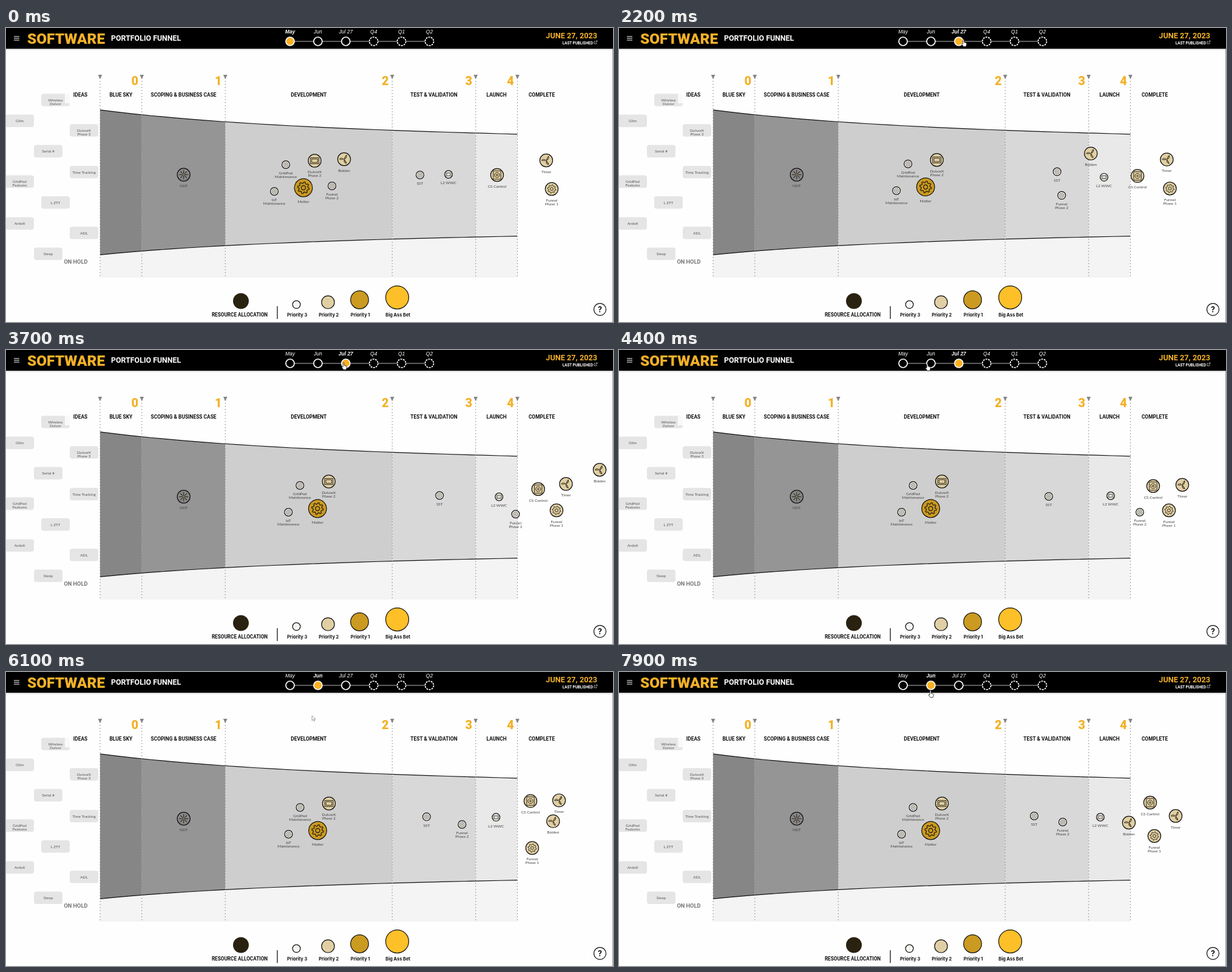
Animation of 1000x484 px, one loop 8 s. Source, as an HTML page:

```html
<!DOCTYPE html>
<html lang="en">
<head>
<meta charset="utf-8">
<title>Portfolio funnel</title>
<style>
html, body { margin: 0; width: 100%; height: 100%; overflow: hidden; background: #fefefe; }
svg { display: block; width: 100%; height: 100%; }
.head { font-family: Roboto, sans-serif; font-weight: 700; }
.black { font-family: Roboto, sans-serif; font-weight: 900; }
.small { font-family: Lato, sans-serif; }
.legend { font-family: Inter, sans-serif; font-weight: 700; }
.date { font-family: "Liberation Sans", Arial, sans-serif; font-style: italic; }
.icon { fill: none; stroke: #2b2413; stroke-width: .14; }
</style>
</head>
<body>
<svg id="stage" viewBox="0 0 1000 484"></svg>
<script>
const GOLD = '#f3b128';
const LEFT = 155, UNIT = 68.75;
const gates = [0, 1, 3, 7, 9, 10].map(n => LEFT + n * UNIT);
const stage = document.getElementById('stage');

const text = (s, x, y, size, cls = 'head', fill = '#111', anchor = 'middle') =>
  `<text x="${x}" y="${y}" font-size="${size}" class="${cls}" fill="${fill}" text-anchor="${anchor}">${s.replace('&', '&amp;')}</text>`;
const rect = (x, y, w, h, fill, r = 0) =>
  `<rect x="${x}" y="${y}" width="${w}" height="${h}" rx="${r}" fill="${fill}"/>`;
const circle = (x, y, r, fill, stroke = '#111', width = 1.2, more = '') =>
  `<circle cx="${x}" cy="${y}" r="${r}" fill="${fill}" stroke="${stroke}" stroke-width="${width}" ${more}/>`;
const path = (d, stroke, width = 1, fill = 'none', more = '') =>
  `<path d="${d}" stroke="${stroke}" stroke-width="${width}" fill="${fill}" ${more}/>`;
const lines = (s, x, y, fill) =>
  s.split('|').map((line, i) => text(line, x, y + i * 6, 6.4, 'small', fill)).join('');

// Header
const dates = ['May', 'Jun', 'Jul 27', 'Q4', 'Q1', 'Q2'];
const dateX = i => 468 + i * 45.9;

function header() {
  return rect(0, 34, 1000, 1, '#bbb') + rect(0, 35, 1000, 1.5, '#eee') + rect(0, 0, 1000, 34, '#000')
    + path('M13 14h9M13 17h9M13 20h9', '#fff', 1.2)
    + text('SOFTWARE', 35, 26, 24.4, 'black', GOLD, 'start')
    + text('PORTFOLIO FUNNEL', 173, 21, 12.4, 'head', '#fff', 'start')
    + text('JUNE 27, 2023', 974, 17, 12.7, 'head', GOLD, 'end')
    + text('LAST PUBLISHED', 967, 26.5, 6.3, 'head', '#fff', 'end')
    + path('M971 22h-2v4h4v-2M971 24l3-3m-2 0h2v2', '#fff', .6)
    + path(`M${dateX(0)} 22H${dateX(5)}`, '#bbb')
    + dates.map((s, i) => `<g class="node">${text(s, dateX(i), 9, 8.5, 'date', '#fff')}`
      + circle(dateX(i), 22, 7, '#000', '#fff', 1.7, i > 2 ? 'stroke-dasharray="3 1.4"' : '') + '</g>').join('');
}

// Funnel: both edges flatten out along the same hyperbola
const bend = x => (x - LEFT) / (x - LEFT + 554);
const upper = x => 134.8 + 72.2 * bend(x);
const lower = x => 373.4 - 55.5 * bend(x);

function curve(f, a, b) {
  const steps = 24;
  return Array.from({ length: steps + 1 }, (_, i) => {
    const x = a + (b - a) * i / steps;
    return `${x.toFixed(2)} ${f(x).toFixed(2)}`;
  }).join('L');
}

function funnel() {
  const [start, end] = [gates[0], gates[5]];
  const bands = [['BLUE SKY', '#868686'], ['SCOPING & BUSINESS CASE', '#959595'], ['DEVELOPMENT', '#cecece'],
    ['TEST & VALIDATION', '#d8d8d8'], ['LAUNCH', '#e9e9e9']];
  const areas = bands.map(([title, fill], i) => {
    const [a, b] = [gates[i], gates[i + 1]];
    return path(`M${curve(upper, a, b)}L${curve(lower, b, a)}Z`, 'none', 0, fill)
      + text(title, (a + b) / 2, 113.3, 8.4)
      + text(String(i), b - 11.5, 94, 20, 'black', GOLD);
  });
  const marks = gates.map(x => path(`M${x} 87V411`, '#858585', 1.1, 'none', 'stroke-dasharray="1.5 3.5"')
    + path(`M${x - 3.3} 77h6.6l-3.3 7.5z`, 'none', 0, '#858585'));
  return path(`M${curve(lower, start, end)}V411H${start}Z`, 'none', 0, '#f4f4f4')
    + areas.join('')
    + [upper, lower].map(f => path('M' + curve(f, start, end), '#111', 1.2)).join('')
    + marks.join('')
    + text('COMPLETE', 882.5, 113.3, 8.4)
    + text('ON HOLD', 95.5, 387.5, 9.2, 'head', '#777', 'start');
}

// Idea pills repeat every three rows, mirrored each time
function ideas() {
  const names = ['Wireless|Dulvor', 'Glim', 'DulvorX|Phase 3', 'Serial #', 'Time Tracking',
    'GridPod|Features', 'L ZTT', 'Ardolt', 'ADL', 'Sleep'];
  const pills = names.map((name, i) => {
    const row = Math.floor(i / 3), col = i % 3, odd = row % 2;
    const x = col ? ((col + odd) % 2 ? 22.5 : 128.5) : 81.5 - 12 * odd;
    const y = 118.5 + 84.4 * row + [0, 34.4, 50][col];
    return rect(x - 23.5, y - 10.3, 47, 20.6, '#e5e5e5', 4) + lines(name, x, y + 2.3, '#555');
  });
  return pills.join('') + '<g opacity=".8">' + rect(97, 106, 10, 18, '#fefefe') + '</g>'
    + text('IDEAS', 122.5, 113.3, 8.4);
}

const WHITE = '#f6f4f0', SAND = '#e0cfa4', AMBER = '#cb9a20';
const radius = level => 6.4 + 4.2 * level;

function legend() {
  const bets = [['Priority 3', 479, WHITE], ['Priority 2', 531, SAND], ['Priority 1', 583, AMBER], ['Big Ass Bet', 645, '#fdc029']];
  return circle(387, 449.5, 13, '#2a2210', 'none')
    + text('RESOURCE ALLOCATION', 385, 475, 8.2)
    + path('M447 458V479', '#111', 1.3)
    + bets.map(([s, x, fill], i) => circle(x - .5, 455.3 - 3.9 * i, radius(i), fill) + text(s, x + .7, 475, 7.4, 'legend')).join('')
    + circle(978.5, 463.3, 10, '#fff') + text('?', 978.5, 467.8, 12.5, 'legend');
}

// Icons have unit radius and are scaled to their circle
const spin = (n, d) => Array.from({ length: n }, (_, i) => `<path d="${d}" transform="rotate(${i * 360 / n})"/>`).join('');
const gearRim = Array.from({ length: 32 }, (_, i) => {
  const r = i % 4 < 2 ? 1 : .76, a = (i + .5) * Math.PI / 16;
  return `${(r * Math.cos(a)).toFixed(3)} ${(r * Math.sin(a)).toFixed(3)}`;
}).join('L');
const icons = {
  gear: `<path d="M${gearRim}Z"/><circle r=".36"/>`,
  fan: spin(3, 'M-.1 0C-.3-.3-.9-.35-1.1 0C-.8.1-.4.05-.1 0Z'),
  screen: '<path d="M-1-.72h2v1.44h-2zM-.7-.42h1.4v.84h-1.4z"/>',
  box: '<path d="M-.9-1h1.8v2h-1.8z"/><circle r=".6"/><circle r=".2"/>',
  star: spin(8, 'M.2 0H1.1')
};

// Motion
const JULY = 1200, JUNE = 4700;
const easeOut = (u, power) => 1 - (1 - u) ** power;
const progress = (t, a, b) => Math.min(1, Math.max(0, (t - a) / (b - a)));

// Walks through the points; spans[i] is the time from point i to point i + 1
function travel(points, spans, t, power) {
  let [x, y] = points[0];
  spans.forEach(([a, b], i) => {
    const u = easeOut(progress(t, a, b), power);
    x += (points[i + 1][0] - points[i][0]) * u;
    y += (points[i + 1][1] - points[i][1]) * u;
  });
  return [x, y];
}

const still = (x, y) => () => [x, y];
const drift = (x, y) => t => travel([[x, y], [x + 23.5, y - 2]], [[1300, 4400]], t, 3);
const roam = (...points) => t => travel(points, [[1300, 3000], [3000, 4400], [JUNE, 6800], [6800, 7900]], t, 2);

const items = [
  ['NDT', 1, '#868686', 'star', still(292.7, 241.5)],
  ['GridPod|Maintenance', 0, WHITE, 'gear', drift(461, 225)],
  ['IoT|Maintenance', 0, WHITE, 'gear', drift(442, 269)],
  ['DulvorX|Phase 2', 1, SAND, 'screen', drift(508.5, 218.5)],
  ['Matter', 2, AMBER, 'gear', drift(490, 263)],
  ['SST', 0, WHITE, 'gear', roam([682, 242], [733, 235], [708, 241], [691, 238], [684, 237])],
  ['L2 WWC', 0, WHITE, 'screen', roam([729, 241], [819, 247], [810, 240], [807, 239], [793, 239])],
  ['Funnel|Phase 2', 0, WHITE, 'gear', roam([537, 260], [784, 280], [858, 267], [738, 249], [731, 247])],
  ['CS Control', 1, SAND, 'box', roam([809, 242], [867, 244], [880, 224], [862, 211], [875, 215])],
  ['Timer', 1, SAND, 'fan', roam([890, 218], [906, 216], [928, 222], [909, 210], [917, 237])],
  ['Funnel|Phase 1', 1, SAND, 'gear', roam([899, 265], [910, 264], [906, 264], [862, 293], [882, 270])],
  ['Bolden', 1, SAND, 'fan', roam([557, 216], [840, 204], [1024, 195], [886, 252], [840, 248])]
];

function item([label, level, fill, icon]) {
  const r = radius(level);
  return `<g class="item">${circle(0, 0, r, fill)}<g class="icon" transform="scale(${r * .65})">${icons[icon]}</g>`
    + lines(label, 0, r + 10, '#444') + '</g>';
}

const pointer = t => travel([[600, 75], [566, 23], [571, 26], [509, 28], [502, 143], [514, 36]],
  [[1000, JULY], [1400, 3000], [3500, 4400], [5600, 6800], [6800, 7900]], t, 1);

stage.innerHTML = header() + path('M999.5 34V484', '#999') + funnel() + ideas() + legend()
  + items.map(item).join('')
  + '<g id="cursor">'
  + path('M-2-5q1-1.5 2 0v4l3.5 1q1 1 .5 3l-1 3h-4l-3-4q0-1.5 2-.5z', '#222', .8, '#fff')
  + path('M-2-4v8l2-1.7 1.5 3 1.3-.6-1.4-3h2.6z', '#777', .7, '#fff') + '</g>';

const nodes = [...stage.querySelectorAll('.node')];
const groups = [...stage.querySelectorAll('.item')];
const cursor = document.getElementById('cursor');
const [hand, arrow] = cursor.children;
const place = (el, [x, y]) => el.setAttribute('transform', `translate(${x.toFixed(2)} ${y.toFixed(2)})`);
const show = (el, on) => el.setAttribute('visibility', on ? 'visible' : 'hidden');

function draw(t) {
  const selected = t < JULY ? 0 : t < JUNE ? 2 : 1;
  nodes.forEach((node, i) => {
    const [label, dot] = node.children;
    label.setAttribute('font-weight', i === selected ? 700 : 400);
    dot.setAttribute('fill', i === selected ? '#fdb022' : '#000');
  });
  groups.forEach((g, i) => place(g, items[i][4](t)));

  const at = pointer(t);
  const over = dates.some((_, i) => Math.hypot(at[0] - dateX(i), at[1] - 22) < 16);
  place(cursor, at);
  show(hand, t >= 1000 && over);
  show(arrow, t >= 1000 && !over);
}

const began = performance.now();
function tick() {
  const t = (performance.now() - began) % 8000;
  draw(Math.floor(t / 100) * 100);
  requestAnimationFrame(tick);
}
tick();
</script>
</body>
</html>
```
